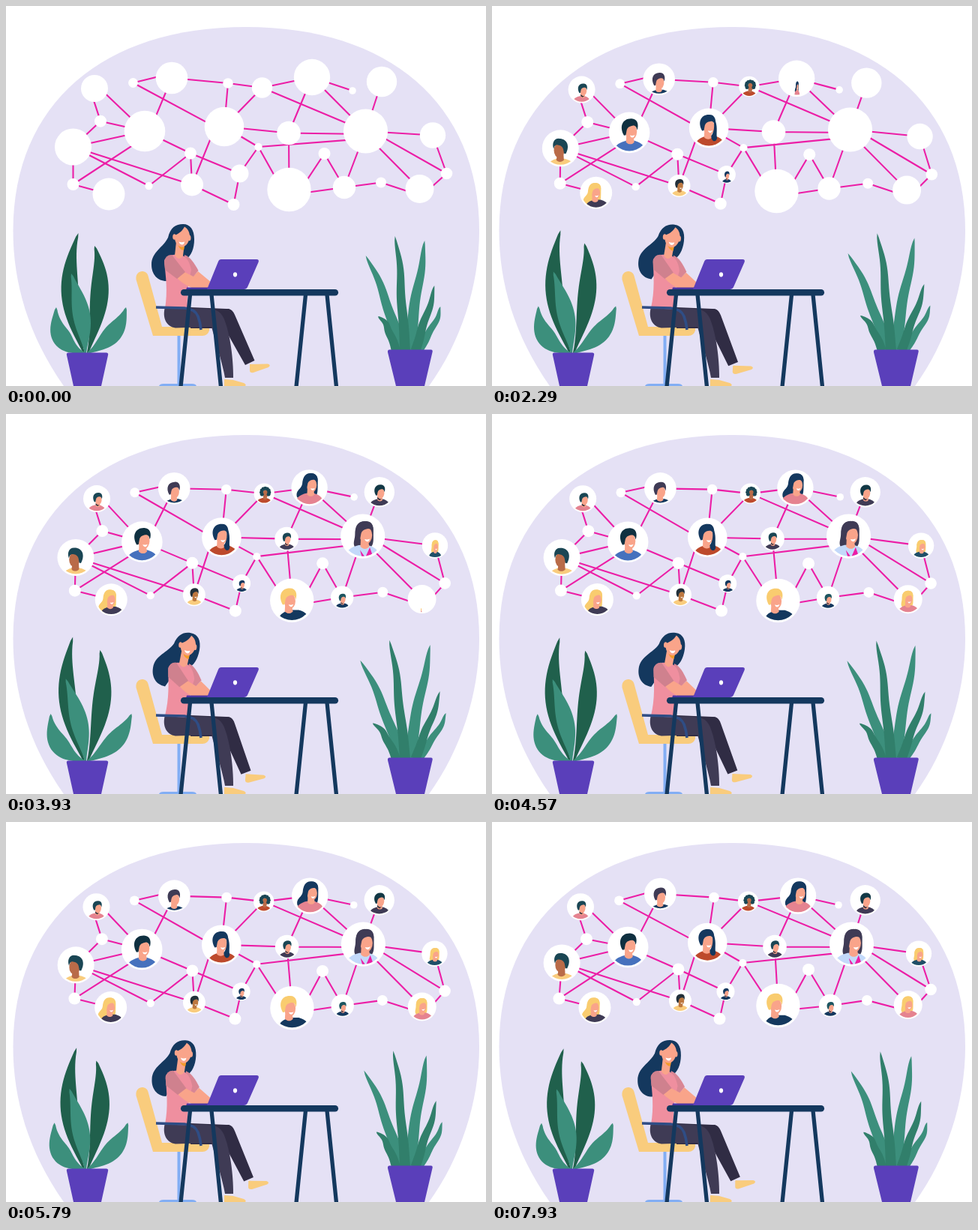
Recreate the animation shown at these times as an HTML page with a canvas. Size 640x507 px, loop 8 s.

```html
<!DOCTYPE html>
<html lang="en">
<head>
<meta charset="utf-8">
<title>Online team network</title>
<style>
html, body { margin: 0; width: 100%; height: 100%; overflow: hidden; background: #fff; }
canvas { display: block; width: 640px; height: 507px; }
</style>
</head>
<body>
<canvas id="stage"></canvas>
<script>
const LOOP = 8000, TURN = 4570, END = 7930;
const canvas = document.getElementById('stage');
const ctx = canvas.getContext('2d');
const dpr = window.devicePixelRatio || 1;
canvas.width = Math.round(640 * dpr);
canvas.height = Math.round(507 * dpr);

const NAVY = '#14385e', PURPLE = '#5a3fba', YELLOW = '#f9cc7d', PINK = '#ef8f9f';
const SKIN = '#f9a48a', BROWN = '#b96b48', MAGENTA = '#ec1ea6', TEAL = '#1a4654';
const BLOND = '#f9cc6f', RUST = '#bd4a2c', PLUM = '#3f3b55', BLUE = '#4671bd';
const ROSE = '#e58390', SKY = '#c3d9fa', LEAF = '#3c8f7c', LEAF_DARK = '#20604c', STALK_DARK = '#317f6b';

const paths = {};
const path = d => paths[d] = paths[d] || new Path2D(d);

function fill(d, color) {
  ctx.fillStyle = color;
  ctx.fill(path(d));
}

function stroke(d, color, width, cap = 'butt') {
  ctx.strokeStyle = color;
  ctx.lineWidth = width;
  ctx.lineCap = cap;
  ctx.stroke(path(d));
}

function oval(x, y, rx, ry, color) {
  ctx.beginPath();
  ctx.ellipse(x, y, rx, ry, 0, 0, 2 * Math.PI);
  ctx.fillStyle = color;
  ctx.fill();
}

function turned(x, y, deg, draw) {
  ctx.save();
  ctx.translate(x, y);
  ctx.rotate(deg * Math.PI / 180);
  ctx.translate(-x, -y);
  draw();
  ctx.restore();
}

// heading: compass direction of the drift, then the axis that swings back
const nodes = {};
const people = [];
function dot(id, x, y, r, heading) {
  nodes[id] = { x, y, r, heading };
}
function person(id, x, y, r, heading, skin, hair, shirt, style, size = 1, dx = 0, dy = 0) {
  dot(id, x, y, r, heading);
  people.push({ id, skin, hair, shirt, style, size, dx, dy });
}

// in order of appearance
person('A', 118, 110, 18, 'SEx', SKIN, TEAL, ROSE, 'short', .85, .05);
person('B', 89.5, 188, 24.5, 'SEy', BROWN, TEAL, YELLOW, 'plain', 1.02, .02, .18);
person('C', 221, 96, 21.3, 'SEy', SKIN, PLUM, NAVY, 'plain', .98, -.05, .25);
person('D', 185, 167, 27.3, 'SWy', SKIN, '#0f3040', BLUE, 'smile');
person('E', 137, 251, 21.5, 'NEx', SKIN, BLOND, PLUM, 'long', .95, -.1);
person('F', 248, 238.5, 15, 'SEy', '#bd7840', '#22303a', YELLOW, 'smile', .95);
person('G', 291, 161, 26.3, 'SWy', SKIN, NAVY, RUST, 'braid', 1, -.08);
person('H', 341.5, 109, 13.7, 'NEx', BROWN, TEAL, RUST, 'curly', .95, .05);
person('I', 311.5, 223.5, 12, 'SEx', SKIN, NAVY, NAVY, 'short', .8, .02);
person('K', 408, 95, 24.2, 'SWx', SKIN, NAVY, ROSE, 'long', 1, .03, -.1);
person('L', 377.5, 245, 29.2, 'SEy', SKIN, BLOND, NAVY, 'smile', .92, -.18);
person('M', 501, 101, 20.2, 'SW', SKIN, '#123845', PLUM, 'short', .88);
person('J', 377, 169.5, 15.8, 'NWx', SKIN, TEAL, PLUM, 'short', .9);
person('N', 451, 242, 15.2, 'SWx', SKIN, '#1d5560', NAVY, 'short', .78);
person('O', 479.5, 167, 29.6, 'NWx', SKIN, PLUM, SKY, 'bob', 1, .05);
person('P', 569, 172.5, 17.2, 'SEx', SKIN, BLOND, '#1f4f68', 'bob', .85);
person('Q', 551.5, 244, 19, 'SEy', SKIN, BLOND, ROSE, 'bob', .95, -.05);

dot('a', 169.5, 102.5, 6.4, 'SEx');
dot('b', 296, 103, 6.8, 'NWx');
dot('c', 462, 113, 4.8, 'NEx');
dot('d', 126, 153.7, 8, 'SEx');
dot('e', 246, 196.5, 8, 'SEy');
dot('f', 190.5, 240, 5.2, 'SEy');
dot('g', 89.5, 238, 8, 'NEx');
dot('h', 303.5, 265, 8, 'NEx');
dot('i', 336.5, 188, 5.2, 'SWy');
dot('j', 424.5, 197, 8, 'SWy');
dot('k', 500, 235.5, 7, 'SEx');
dot('l', 587.5, 223.5, 7.8, 'SWy');

// a number slides the second end sideways from the middle of its node
const links = ('dA-6 DA5 dB dD BD DC aC-6 aG6 Cb bH bG HG HK HO Kc KJ KO MO GJ Gi FG-11 JO4 iO10 JL iL8 iI ' +
  'Ih Fh Fe eD eI ef Bg gE gD7 Bf BF jL-13 jN NL-7 NO Nk kQ8 lQ-9 QO-3 lO4 OP Pl')
  .replace('DC', 'CD-6').split(' ');

// everything swings out until TURN; then one axis swings back
function place({ x, y, r, heading }, t) {
  const out = (1 - Math.cos(Math.PI * Math.min(1, t / TURN))) / 2;
  const back = 1 - Math.max(0, (t - TURN) / (END - TURN)) ** 1.5;
  const reach = (1.9 + .07 * r) * out;
  const [ns, ew, axis] = heading;
  return {
    x: x + (ew === 'E' ? reach : -reach) * (axis === 'x' ? back : 1),
    y: y + (ns === 'S' ? reach : -reach) * (axis === 'y' ? back : 1),
    r
  };
}

function drawPerson({ skin, hair, shirt, style, size, dx, dy }, node, k) {
  if (k <= 0) return;
  const female = 'long braid bob'.includes(style);
  ctx.save();
  ctx.beginPath();
  ctx.arc(node.x, node.y, node.r * .9, 0, 2 * Math.PI);
  ctx.clip();
  ctx.translate(node.x, node.y);
  ctx.scale(node.r, node.r);
  ctx.translate(dx, .9);
  // pops up from the bottom, height ahead of width
  ctx.scale(k * size * (style === 'plain' && skin === BROWN ? -1 : 1), size * (1 - (1 - k) ** 3));
  ctx.translate(0, dy - .9);
  if (style === 'long') {
    fill('M.08-.7C-.3-.74-.4-.4-.42-.15C-.45.2-.8.2-.72.6C-.6.8-.3.75 0 .7L.3.6C.45.4.42.2.43-.2C.46-.5.35-.68.08-.7Z', hair);
  } else if (style === 'bob') {
    fill('M.06-.68C-.3-.7-.4-.4-.4-.1C-.4.15-.52.3-.4.5L.34.46C.46.3.42.1.43-.2C.44-.5.34-.66.06-.68Z', hair);
  }
  // shoulders lean against the head
  ctx.save();
  ctx.translate(-1.5 * dx, 0);
  fill('M-.8 1.2C-.8.66-.55.5-.16.4L.26.4C.62.5.82.68.84 1.2Z', shirt);
  if (shirt === SKY) fill('M-.1.62L.14.95L.34.5L.5.95L0 1Z', MAGENTA);
  ctx.restore();
  fill('M-.14.1L-.16.46C-.06.6.16.6.24.46L.2.2Z', skin);
  if (style === 'short') fill('M-.14.22C-.04.4.1.42.2.38L.02.5L-.15.4Z', '#33333f');
  oval(.09, -.05, .28, .4, skin);
  if (style === 'curly') {
    for (let i = 0; i < 9; i++) {
      const a = Math.PI * (.82 + i * .17);
      oval(.06 + Math.cos(a) * .4, -.18 + Math.sin(a) * .4, .19, .19, hair);
    }
  } else {
    fill('M-.26.14C-.5-.28-.34-.68.08-.68C.4-.7.48-.38.38-.12C.36-.26.3-.36.16-.34C.02-.32-.1-.26-.13-.1L-.17.12Z', hair);
  }
  if (style === 'braid') fill('M.34-.3C.36 0 .34.2.2.4C.2.7.46.75.5.5C.44.3.54 0 .42-.35Z', hair);
  if (female || style === 'smile') fill('M.03.13Q.16.17.27.11Q.22.25.14.24Q.06.23.03.13Z', '#fff');
  ctx.restore();
}

function drawNetwork(t) {
  const now = {};
  for (const id in nodes) now[id] = place(nodes[id], t);
  ctx.strokeStyle = MAGENTA;
  ctx.lineWidth = 2.1;
  ctx.lineCap = 'butt';
  ctx.beginPath();
  for (const link of links) {
    const a = now[link[0]], b = now[link[1]];
    const slide = Number(link.slice(2)) / Math.hypot(b.x - a.x, b.y - a.y);
    ctx.moveTo(a.x, a.y);
    ctx.lineTo(b.x - (b.y - a.y) * slide, b.y + (b.x - a.x) * slide);
  }
  ctx.stroke();
  for (const n of Object.values(now)) oval(n.x, n.y, n.r, n.r, '#fff');
  people.forEach((p, i) => drawPerson(p, now[p.id], Math.min(1, (t - 70 - 240 * i) / 350)));
}

const leafWidth = k => .1 + .9 * Math.sin(Math.PI * k ** .95) ** 1.4;
const stalkWidth = k => (1 - .3 * k) * (1 - k ** 4) ** .7;

// a plant spreads and stretches its blades with the sway
function plant(rootX, rootY, sway, profile, wave) {
  return (base, bendX, bendY, tipX, tipY, width, color) => {
    const spread = (tipX < rootX ? -7.5 : 7.5) * sway;
    const lift = (tipY - rootY) * .035 * sway;
    const tx = tipX + spread, ty = tipY + lift;
    const bx = bendX + spread * .4, by = bendY + lift * .5;
    const left = [], right = [];
    for (let i = 0; i <= 28; i++) {
      const k = i / 28, q = 1 - k;
      const x = q * q * base + 2 * q * k * bx + k * k * tx + wave * Math.sin(k * 11) * k;
      const y = q * q * rootY + 2 * q * k * by + k * k * ty;
      const vx = q * (bx - base) + k * (tx - bx), vy = q * (by - rootY) + k * (ty - by);
      const w = width * (i === 28 ? 0 : profile(k)) / Math.hypot(vx, vy);
      left.push([x + vy * w, y - vx * w]);
      right.unshift([x - vy * w, y + vx * w]);
    }
    ctx.beginPath();
    for (const [x, y] of left.concat(right)) ctx.lineTo(x, y);
    ctx.fillStyle = color;
    ctx.fill();
  };
}

function drawPlants(sway) {
  const leaf = plant(106, 463, sway, leafWidth, 0);
  leaf(104, 70, 377, 96.5, 303, 11.5, LEAF_DARK);
  leaf(109, 136, 373, 118, 320, 12, LEAF_DARK);
  leaf(106, 104, 410, 87, 357, 11.5, LEAF);
  leaf(104, 62, 450, 67, 402, 12.5, LEAF);
  leaf(109, 151, 440, 160, 402, 12, LEAF);
  const stalk = plant(539, 460, sway, stalkWidth, 1.8);
  stalk(528, 511, 400, 481.5, 333, 7.5, LEAF);
  stalk(538, 545, 388, 560, 313, 8, LEAF);
  stalk(550, 568.5, 432, 581, 401, 5.5, LEAF);
  stalk(532, 528, 385, 520.5, 307, 7, STALK_DARK);
  stalk(546, 556.5, 425, 573, 373, 6.5, STALK_DARK);
  stalk(520, 511, 428, 498, 414, 6, STALK_DARK);
  fill('M83.5 462.5H133.5Q137 462.5 136 466L127 507H90L81 466Q80 462.5 83.5 462.5Z', PURPLE);
  fill('M511.5 458.5H566.5Q569.5 458.5 568.5 462L558 507H520L509 462Q508.5 458.5 511.5 458.5Z', PURPLE);
}

function drawChair() {
  fill('M228.5 438H232.5V507H228.5Z', '#82aef4');
  fill('M204 507Q205 504 210 504H248Q253 504 254 507Z', '#82aef4');
  fill('M173.5 365C172 352 187 351 189.5 360L208 428H268Q272 429 271 433Q269 440 262 440H196Z', YELLOW);
}

function drawLegs(sway) {
  fill('M246 402L294 404Q303 404 303 414L292 430H246Z', '#302c44');
  turned(294, 412, 4.7 * sway, () => {
    fill('M325 478L349 477.5Q354 479 350 482L330 489Q325 490 325 486Z', YELLOW);
    fill('M284 412Q288 403 297 404Q302 405 305 412L331.5 473L319 479L288 424Z', '#302c44');
  });
  fill('M291 498L303 499L317 503Q321 505 319 507H291Z', YELLOW);
  fill('M212 402C208 416 214 428 226 429.5L274 428C280 450 289 478 292 496H303C303 470 299 438 291 418C286 406 279 404 262 404Z', PLUM);
}

function drawTorso(sway) {
  turned(236, 305, 5 * sway, () =>
    fill('M236 291C246 291 251 299 251 311C251 324 247 333 240 338L226 342L214 367C202 367 194 358 194 345C194 328 210 322 216 309C219 296 226 291 236 291Z', NAVY));
  fill('M249 361L256 354L274 369V377L262 372Z', SKIN);
  fill('M238 332C246 335 251 343 256.5 353L249 362L236 352Z', '#d98694');
  fill('M211 340C213 333 222 331 232 332C240 333 245 341 247 352C244 366 241 380 242 404H212C216 380 213 362 211 340Z', PINK);
  fill('M227 314L225 333Q231 341 236 333L238 317Z', SKIN);
  fill('M229 318Q234 322 238 320L237 326Q231 325 229 318Z', '#f39b2c');
  fill('M227 362L238 355L258 365L274 370L272 377H250Q235 371 227 362Z', SKIN);
  fill('M211 342Q212 332 221 332L239 355L228 364L212 352Z', '#cf818e');
  oval(224.5, 308, 2.3, 3.8, SKIN);
  oval(244.5, 309.5, 2, 3.8, SKIN);
  fill('M238 294.5C234 302 229 304 225 306C224 315 229 321.5 235 321.5C241 321 245 313 245 306C244 300 242 297 238 294.5Z', SKIN);
  fill('M230.5 314.5Q234 316 238 314.5Q237.5 318.5 234.5 318.5Q231.5 318 230.5 314.5Z', '#fff');
}

function drawDesk() {
  stroke('M200 402L238 403Q252 404 256 414Q259 422 260 432', '#2f4d85', 3.6);
  fill('M241 375.5H270L271 379H240Z', '#4a35a0');
  fill('M287 338H334Q338 338 336.5 342L322 375Q320.5 378 317 378H268L283 341Q284 338 287 338Z', PURPLE);
  oval(305.5, 358.3, 2.6, 3.1, '#fff');
  stroke('M245.5 385L233 508M274 385L286.5 508M399.5 385L387 508M428 385L440.5 508', NAVY, 5.3);
  stroke('M237.2 382.2H438.8', NAVY, 8.5, 'round');
}

function draw(t) {
  // shared rhythm of the plants and the woman
  const sway = (1 - Math.cos(2 * Math.PI * (t - 120) / 7000)) / 2;
  ctx.setTransform(dpr, 0, 0, dpr, 0, 0);
  ctx.fillStyle = '#fff';
  ctx.fillRect(0, 0, 640, 507);
  fill('M77 507C30 440 9.5 370 9.5 300C9.5 130 130 28 320 28C510 28 631 130 631 300C631 375 605 450 564 507Z', '#e5e1f5');
  drawNetwork(t);
  drawPlants(sway);
  drawChair();
  drawLegs(sway);
  turned(228, 402, 5 * sway, () => drawTorso(sway));
  drawDesk();
}

const begin = performance.now();
function tick() {
  draw((performance.now() - begin) % LOOP);
  requestAnimationFrame(tick);
}
tick();
</script>
</body>
</html>
```
